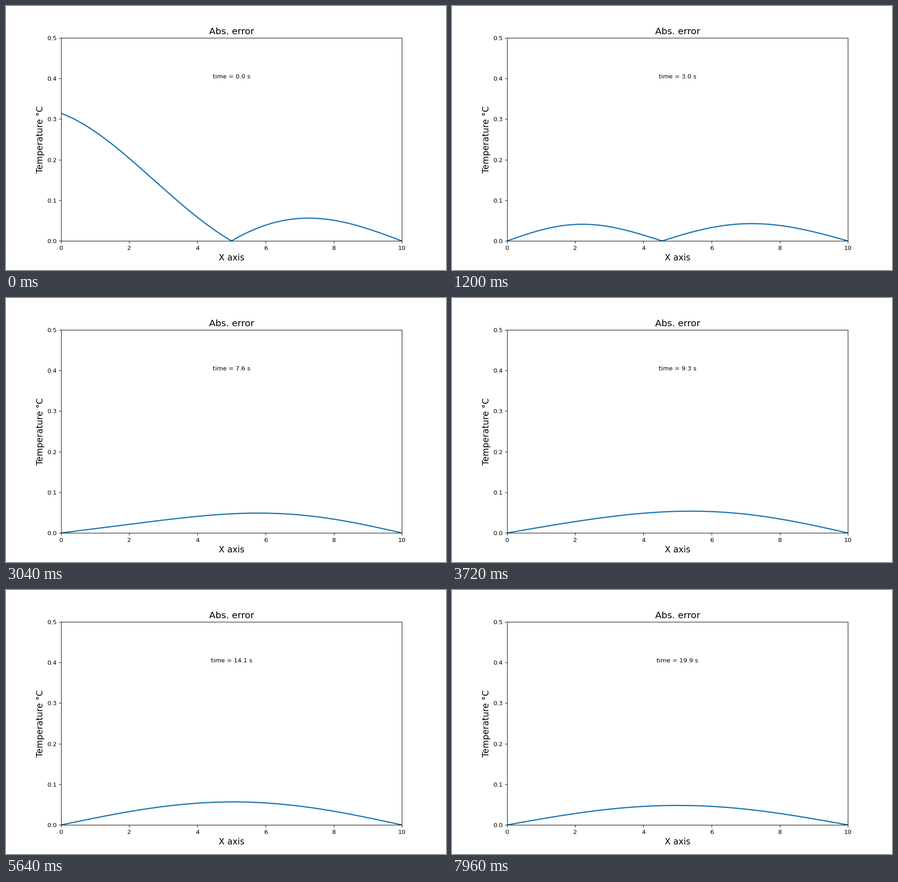
These frames come from a looping animation (966x580 px, 8000 ms). A matplotlib script:

```python
import numpy as np
import matplotlib.pyplot as plt
from matplotlib.animation import FuncAnimation

plt.rcParams["font.family"] = "DejaVu Sans"

WIDTH, HEIGHT = 966, 580
DPI = 96.6
LENGTH = 10.0
DT = 0.1
HOLD = 0.025  # s until the left end drops to zero
FRAMES = 200

x = np.linspace(0, LENGTH, 201)
rate = (np.pi / LENGTH) ** 2

# Sine series of the initial error (pi/L) (1 - x/L) cos(pi x/L)
n = np.arange(1, 121)
coef = np.empty(n.size)
coef[0] = 0.05
coef[1:] = 0.2 * n[1:] / (n[1:] ** 2 - 1)
coef += 2 * rate / LENGTH * HOLD * n
modes = np.sin(np.pi * np.outer(x, n) / LENGTH)


def error(t):
    if t == 0:
        s = x / LENGTH
        return np.abs(np.pi / LENGTH * (1 - s) * np.cos(np.pi * s))
    amp = coef * np.exp(-rate * n**2 * t)
    # the first mode is driven in resonance
    amp[0] -= 2 * rate / LENGTH * t * np.exp(-rate * t)
    return np.abs(modes @ amp)


# the tiny margin keeps the pixel size from being rounded down
size = ((WIDTH + 1e-6) / DPI, (HEIGHT + 1e-6) / DPI)
fig, ax = plt.subplots(figsize=size, dpi=DPI)
ax.set_xlim(0, LENGTH)
ax.set_ylim(0, 0.5)
ax.set_title("Abs. error", fontsize=15)
ax.set_xlabel("X axis", fontsize=14)
ax.set_ylabel("Temperature °C", fontsize=14)

line, = ax.plot(x, error(0), color="#1f77b4", lw=2)
clock = ax.text(0.5, 0.8, "", ha="center", transform=ax.transAxes)


def update(i):
    t = i * DT
    line.set_ydata(error(t))
    clock.set_text(f"time = {t:.1f} s")
    return line, clock


anim = FuncAnimation(fig, update, frames=FRAMES, interval=40,
                     repeat=True, repeat_delay=0)
plt.show()
```
